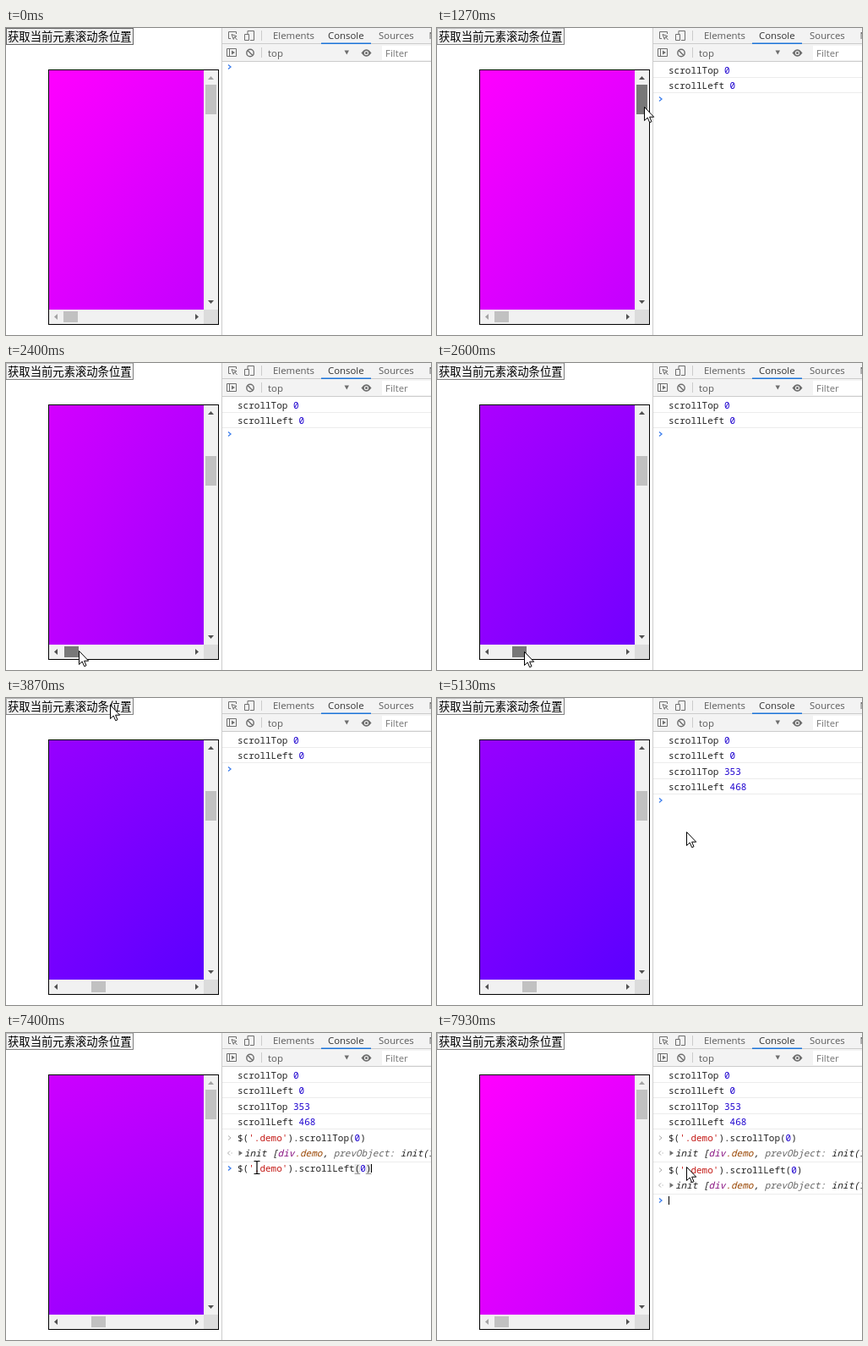
An HTML page for the animation above (8000 ms loop, 503x363 px).

```html
<!DOCTYPE html>
<html lang="zh-CN">
<head>
<meta charset="utf-8">
<title>Scroll position demo</title>
<style>
html, body { margin: 0; width: 503px; height: 363px; overflow: hidden; background: #fff; }
svg { display: block; }
text { white-space: pre; }
.ui { font: 11.4px "Open Sans", "Noto Sans", sans-serif; fill: #5a5a5a; }
.code { font: 11px "Noto Sans Mono", "DejaVu Sans Mono", monospace; fill: #222; }
.result { font-style: italic; }
.str { fill: #c41a16; }
.num { fill: #1c00cf; }
.tag { fill: #881280; }
.cls { fill: #994500; }
.key { fill: #666; }
.button { font: 13.333px "Noto Sans CJK SC", "Noto Sans CJK", sans-serif; }
.icon { fill: none; stroke: #6e6e6e; }
</style>
</head>
<body>
<svg id="stage" width="503" height="363" viewBox="0 0 503 363">
  <defs>
    <radialGradient id="glow" gradientUnits="userSpaceOnUse" cx="1000" cy="1000" r="1414.2">
      <stop offset="0" stop-color="#00f"/><stop offset="1" stop-color="#f0f"/>
    </radialGradient>
    <clipPath id="view"><rect x="51" y="50" width="183" height="283"/></clipPath>
  </defs>

  <rect id="face" x=".5" y=".5" width="150" height="19" fill="#f2f2f2"/>
  <path id="edge" d="M150.5 0V19.5H0" fill="none"/>
  <text class="button" x="2" y="15">获取当前元素滚动条位置</text>

  <rect x="50.5" y="49.5" width="201" height="301" fill="#f1f1f1" stroke="#000"/>
  <g clip-path="url(#view)"><rect id="content" width="2000" height="2000" fill="url(#glow)"/></g>
  <rect x="234" y="333" width="17" height="17" fill="#dcdcdc"/>
  <path id="up" d="M239 61l3.5-4 3.5 4z"/>
  <path d="M239 322l3.5 4 3.5-4z" fill="#505050"/>
  <path id="left" d="M61 338l-4 3.5 4 3.5z"/>
  <path d="M224 338l4 3.5-4 3.5z" fill="#505050"/>
  <rect id="vThumb" x="236" width="13" height="35"/>
  <rect id="hThumb" y="335" width="17" height="13"/>

  <rect x="255" width="248" height="363" fill="#fff"/>
  <rect x="255" width="248" height="39" fill="#f3f3f3"/>
  <path d="M255.5 0V363M256 18.5H503M256 39.5H503M302.5 3V15M302.5 23V35" stroke="#ccc" fill="none"/>
  <rect x="445" y="21" width="58" height="17" fill="#fff"/>
  <rect x="373" y="17.5" width="59" height="1.5" fill="#1a73d8"/>
  <g class="icon">
    <path d="M266 12.5H263.500V4.500H272.500V7M267 7.500l6 2.200-2.700 1-1 2.700zM270.500 10.500l3 3.500"/>
    <path d="M286 7V3.500H293.500V14.500H289M282.500 7.500H287.500V14.500H282.500z"/>
    <path d="M261.500 24.500H272.500V33.500H261.500zM264.500 24.500V33.500"/>
    <circle cx="289" cy="29.500" r="4.200" stroke-width="1.400"/>
    <path d="M286 26.500l6 6" stroke-width="1.400"/>
  </g>
  <path d="M267 26.500l4 2.500-4 2.500zM400.500 26.500h5.500l-2.700 5zM420.500 29.500q6-8.500 12 0q-6 8.500-12 0z" fill="#6e6e6e"/>
  <circle cx="426.500" cy="29.500" r="2.600" fill="#f3f3f3"/><circle cx="426.500" cy="29.500" r="1.500" fill="#6e6e6e"/>
  <g class="ui">
    <text x="316" y="13">Elements</text>
    <text x="381" y="13" fill="#333">Console</text>
    <text x="441" y="13">Sources</text>
    <text x="500.500" y="13">Network</text>
    <text x="310" y="33.500">top</text>
    <text x="449" y="33.500" fill="#757575">Filter</text>
  </g>

  <g id="log" class="code"></g>
  <g id="prompt" class="code">
    <path d="M263 -6.500l3 2.500-3 2.500" fill="none" stroke="#3b7ded" stroke-width="1.300"/>
    <g id="brackets" fill="#e6e6e6" stroke="#999"></g>
    <text id="typed" x="274"></text>
    <rect id="caret" y="-9" width="1" height="10" fill="#000"/>
  </g>

  <path id="arrow" d="M.5 .5V16.500L4.200 13 6.700 18.700 9 17.700 6.600 12.200H11.700z" fill="#fff" stroke="#000"/>
  <path id="beam" d="M-3.500 -7.500H-1Q0 -7.500 0 -6.500Q0 -7.500 1 -7.500H3.500M0 -7V7M-3.500 7.500H-1Q0 7.500 0 6.500Q0 7.500 1 7.500H3.500" fill="none" stroke="#000" stroke-width="1.200"/>
</svg>
<script>
const $ = id => document.getElementById(id);
const set = (id, attrs) => { for (const k in attrs) $(id).setAttribute(k, attrs[k]); };
const show = (id, on) => set(id, { visibility: on ? "visible" : "hidden" });
const LOOP = 8000, TICK = 1000 / 15, CHAR = 6.6;
const V_RATE = (2000 - 283) / (249 - 35), H_RATE = (2000 - 183) / (149 - 17);

const paint = s => s.replace(/('[^']*')|(\d+)/g, (m, str) =>
  `<tspan class="${str ? "str" : "num"}">${m}</tspan>`);
const call = what => `$('.demo').scroll${what}`;
const TOP = call("Top(0)"), LEFT = call("Left(0)"), OLDER = call("Top('500px')");

// Console rows: time shown, baseline, markup
const line = y => `<path d="M256 ${y}.5H503" stroke="#ececec"/>`;
const message = (y, s) => `<text x="274" y="${y}">${paint(s)}</text>` + line(y + 4);
const command = (y, s) =>
  `<path d="M263 ${y - 6.5}l3 2.500-3 2.500" fill="none" stroke="#aaa"/><text x="274" y="${y}">${paint(s)}</text>`;
const result = y => `<path d="M265 ${y - 6.5}l-2.500 2.500 2.500 2.500M266.500 ${y - 4}h1.200" fill="none" stroke="#aaa"/>
  <path d="M275.500 ${y - 7}l4.500 3-4.500 3z" fill="#6e6e6e"/>
  <text class="result" x="282" y="${y}">init [<tspan class="tag">div</tspan><tspan class="cls">.demo</tspan>, <tspan class="key">prevObject: </tspan>init(1)]</text>` + line(y + 6);
const rows = [
  [260, message(54, "scrollTop 0") + message(72, "scrollLeft 0")],
  [4000, message(91, "scrollTop 353") + message(109, "scrollLeft 468")],
  [6530, command(128, TOP) + result(146)],
  [7865, command(166, LEFT) + result(184)]
];
$("log").innerHTML = rows.map((r, i) => `<g id="row${i}">${r[1]}</g>`).join("");

// Prompt: time, baseline, text, caret visible
const prompts = [
  [0, 50, "", 0], [260, 88, "", 0], [4000, 125, "", 0], [4600, 125, "", 1], [5130, 125, "", 0],
  [5265, 125, OLDER, 1], [5400, 125, LEFT, 1], [5930, 125, LEFT, 0], [6130, 125, TOP, 0],
  [6530, 164, "", 1], [6865, 164, TOP, 1], [7000, 164, OLDER, 1], [7400, 164, LEFT, 1],
  [7865, 202, "", 1]
];

// Pointer: time, x, y
const path = [
  [260, 128, 10], [500, 165, 30], [800, 218, 68], [1066, 245, 90], [1200, 245, 92], [1266, 245, 93],
  [1733, 245, 136], [1866, 222, 220], [2000, 140, 317], [2133, 92, 336], [2266, 84, 340],
  [2400, 86, 340], [2733, 114, 341], [2866, 114, 342], [3000, 113, 344], [3200, 128, 337],
  [3333, 230, 265], [3466, 289, 180], [3600, 220, 70], [3733, 126, 8], [3866, 123, 8],
  [4000, 128, 14], [4200, 222, 85], [4400, 295, 157], [4600, 295, 158]
];
const vDrag = [[1200, 0], [1266, 1], [1733, 44]];
const hDrag = [[2333, 0], [2400, 2], [2733, 34]];

function along(keys, t, col = 1) {
  let i = keys.findIndex(k => k[0] > t);
  if (i === 0) return keys[0][col];
  if (i < 0) return keys[keys.length - 1][col];
  const a = keys[i - 1], b = keys[i];
  return a[col] + (b[col] - a[col]) * (t - a[0]) / (b[0] - a[0]);
}
const within = (t, a, b) => t >= a && t < b;
const thumbFill = (t, hover, press, release, leave) =>
  within(t, press, release) ? "#787878" : within(t, hover, leave) ? "#a8a8a8" : "#c1c1c1";

function drawPrompt(t) {
  const [, y, text, caret] = prompts.filter(p => p[0] <= t).pop();
  set("prompt", { transform: `translate(0 ${y})` });
  $("typed").innerHTML = paint(text);
  set("caret", { x: Math.floor(274 + text.length * CHAR) });
  show("caret", caret);
  const spots = text ? [text.lastIndexOf("("), text.length - 1] : [];
  $("brackets").innerHTML = spots.map(i => {
    const x = 274 + i * CHAR;
    return `<rect x="${x}" y="-9" width="${CHAR}" height="12" stroke="none"/><path d="M${x} 2.500h${CHAR}"/>`;
  }).join("");
}

function draw(time) {
  const t = Math.floor((time % LOOP + 5) / TICK) * TICK + 4;
  const top = t > 6590 ? 0 : Math.floor(Math.round(along(vDrag, t)) * V_RATE);
  const left = t > 7925 ? 0 : Math.floor(Math.round(along(hDrag, t)) * H_RATE);
  set("content", { transform: `translate(${51 - left} ${50 - top})` });
  set("vThumb", { y: 67 + Math.floor(top / V_RATE), fill: thumbFill(t, 1060, 1200, 1733, 1800) });
  set("hThumb", { x: 68 + Math.floor(left / H_RATE), fill: thumbFill(t, 2200, 2333, 2866, 3000) });
  set("up", { fill: top ? "#505050" : "#a3a3a3" });
  set("left", { fill: left ? "#505050" : "#a3a3a3" });

  const pressed = t < 66 || within(t, 3930, 4000);
  const hover = t < 400 || within(t, 3660, 4130);
  set("face", { stroke: pressed ? "#666" : hover ? "#b0b0b0" : "#b8b8b8", fill: pressed ? "#eee" : "#f2f2f2" });
  set("edge", { stroke: pressed ? "#666" : "#808080" });

  rows.forEach((r, i) => $("row" + i).style.display = t >= r[0] ? "" : "none");
  drawPrompt(t);

  const beam = within(t, 6590, 7925);
  const x = Math.round(along(path, t)), y = Math.round(along(path, t, 2));
  set("arrow", { transform: `translate(${x} ${y})` });
  set("beam", { transform: `translate(${x + 2} ${y + 1})` });
  show("arrow", t >= 260 && !beam);
  show("beam", beam);
}

const start = performance.now();
function loop() {
  draw(performance.now() - start);
  requestAnimationFrame(loop);
}
loop();
</script>
</body>
</html>
```
